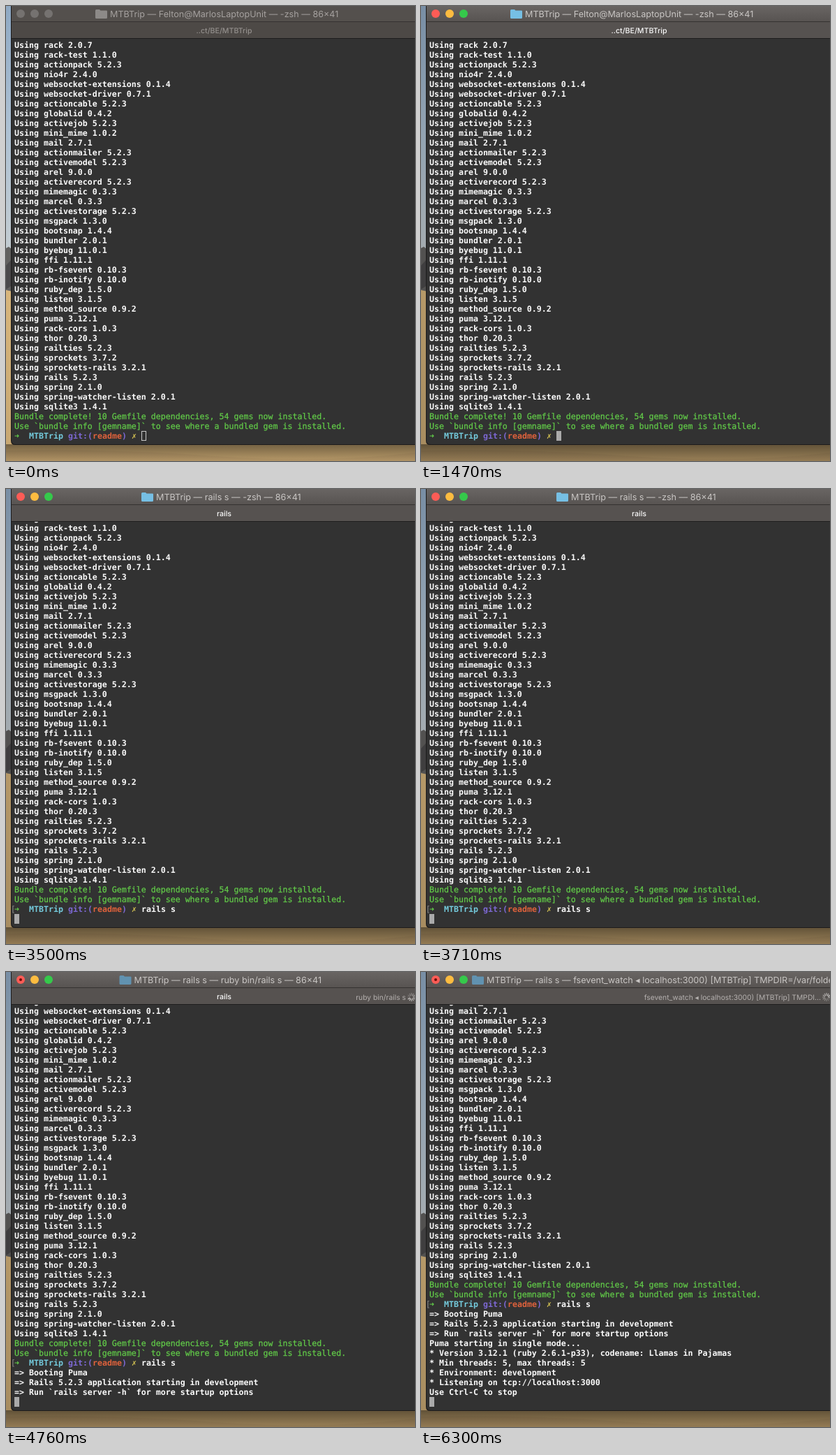
These frames come from a looping animation (586x652 px, 6.37 s). An HTML page:

```html
<!DOCTYPE html>
<html lang="en">
<head>
<meta charset="utf-8">
<title>Terminal session</title>
<style>
  html, body { margin: 0; width: 100%; height: 100%; overflow: hidden; background: #333; }
  svg { display: block; width: 586px; height: 652px; }
  text { white-space: pre; text-rendering: geometricPrecision; }
  .mono { font: bold 11.627px "DejaVu Sans Mono", monospace; fill: #fbfbfb; }
  .ui { font-family: Inter, sans-serif; }
  .green { font-weight: normal; fill: #62cb49; stroke: #62cb49; stroke-width: .25px; }
</style>
</head>
<body>
<svg id="stage" viewBox="0 0 586 652" xmlns="http://www.w3.org/2000/svg">
  <defs>
    <linearGradient id="sky" x2="0" y2="1">
      <stop offset="0" stop-color="#8fa9c4"/>
      <stop offset=".5" stop-color="#adc1d3"/>
      <stop offset="1" stop-color="#c3ccd1"/>
    </linearGradient>
    <linearGradient id="sand" x2="0" y2="1">
      <stop offset="0" stop-color="#d8b67c"/>
      <stop offset="1" stop-color="#c6a671"/>
    </linearGradient>
    <linearGradient id="under" x2="0" y2="1">
      <stop offset="0" stop-color="#000" stop-opacity=".42"/>
      <stop offset="1" stop-color="#000" stop-opacity=".08"/>
    </linearGradient>
    <linearGradient id="activeBar" x2="0" y2="1">
      <stop offset="0" stop-color="#696563"/>
      <stop offset="1" stop-color="#575351"/>
    </linearGradient>
  </defs>
  <rect width="586" height="348" fill="url(#sky)"/>
  <path d="M0 347L4 345L9 349V410H0Z" fill="#62615f"/>
  <path d="M0 372L9 362V400L0 406Z" fill="#4b4a4b"/>
  <path d="M0 407L9 409V628H586V652H0Z" fill="url(#sand)"/>
  <path d="M0 637Q150 634 300 645T586 640V652H0Z" fill="#b79868" opacity=".45"/>
  <rect y="628" width="586" height="24" fill="url(#under)"/>
  <rect id="shade" width="586" height="652" fill="#000"/>
  <path d="M7 0V623Q7 629 13 629H586V0Z" fill="#1c1b1b"/>
  <path d="M8 0V622Q8 628 14 628H586V0Z" fill="#323232"/>
  <g id="screen" class="mono"></g>
  <rect id="cursor" height="14"/>
  <rect id="titleBar" x="8" width="578" height="23"/>
  <rect id="tabBar" x="8" y="23" width="578" height="23"/>
  <path d="M8 22.5H586" stroke="#353231"/>
  <path d="M8 46.5H586" stroke="#1e1d1d"/>
  <g id="lights"></g>
  <circle id="edited" cx="21" cy="11" r="2" fill="#6d0d0a"/>
  <path id="folder" d="M0 6.5Q0 5 1.5 5H6L7.5 6.5H16Q17 6.5 17 7.5V16.5Q17 18 15.5 18H1.5Q0 18 0 16.5Z"/>
  <text id="title" class="ui" y="16" font-size="12.6"></text>
  <text id="tab" class="ui" x="312.5" y="39" font-size="10.6" font-weight="500" text-anchor="middle"></text>
  <text id="process" class="ui" x="573" y="40" font-size="10.3" text-anchor="end" fill="#b5b1af"></text>
  <g id="spinner" transform="translate(581 36)" stroke="#d6d3d1" stroke-width="1.1" stroke-linecap="round"></g>
</svg>
<script>
const LOOP = 6370, TICK = 70, COL = 7, ROW = 14, LEFT = 12, TOP = 49;
const ACTIVATE = 1190, ENTER = 3430, RUBY = 4200, BOOT = 4690, LISTEN = 4900, WATCH = 4970;
const KEY_TIMES = [2310, 2450, 2590, 2800, 2940, 3080, 3220];
const COMMAND = "rails s";

const gems = `rack 2.0.7|rack-test 1.1.0|actionpack 5.2.3|nio4r 2.4.0|websocket-extensions 0.1.4
websocket-driver 0.7.1|actioncable 5.2.3|globalid 0.4.2|activejob 5.2.3|mini_mime 1.0.2|mail 2.7.1
actionmailer 5.2.3|activemodel 5.2.3|arel 9.0.0|activerecord 5.2.3|mimemagic 0.3.3|marcel 0.3.3
activestorage 5.2.3|msgpack 1.3.0|bootsnap 1.4.4|bundler 2.0.1|byebug 11.0.1|ffi 1.11.1
rb-fsevent 0.10.3|rb-inotify 0.10.0|ruby_dep 1.5.0|listen 3.1.5|method_source 0.9.2|puma 3.12.1
rack-cors 1.0.3|thor 0.20.3|railties 5.2.3|sprockets 3.7.2|sprockets-rails 3.2.1|rails 5.2.3
spring 2.1.0|spring-watcher-listen 2.0.1|sqlite3 1.4.1`.split(/[|\n]/);

const summary = [
  "Bundle complete! 10 Gemfile dependencies, 54 gems now installed.",
  "Use `bundle info [gemname]` to see where a bundled gem is installed."
];

const output = [
  "=> Booting Puma",
  "=> Rails 5.2.3 application starting in development",
  "=> Run `rails server -h` for more startup options",
  "Puma starting in single mode...",
  "* Version 3.12.1 (ruby 2.6.1-p33), codename: Llamas in Pajamas",
  "* Min threads: 5, max threads: 5",
  "* Environment: development",
  "* Listening on tcp://localhost:3000",
  "Use Ctrl-C to stop"
];

// Column, text and colour of each part of the shell prompt
const prompt = [
  [0, "➜", "#62cb49"], [3, "MTBTrip", "#74cbdd"], [11, "git:(", "#7d68d4"],
  [16, "readme", "#e0623c"], [22, ")", "#7d68d4"], [24, "✗", "#d8c653"]
];
const INPUT_COL = 26;

const titles = {
  shell: { x: 149, text: "MTBTrip — Felton@MarlosLaptopUnit — -zsh — 86×41", tab: "..ct/BE/MTBTrip", process: "" },
  rails: { x: 215, text: "MTBTrip — rails s — -zsh — 86×41", tab: "rails", process: "" },
  ruby: { x: 183.5, text: "MTBTrip — rails s — ruby bin/rails s — 86×41", tab: "rails", process: "ruby bin/rails s" },
  watch: {
    x: 94, text: "MTBTrip — rails s — fsevent_watch ◂ localhost:3000) [MTBTrip] TMPDIR=/var/folders/",
    tab: "", process: "fsevent_watch ◂ localhost:3000) [MTBTrip] TMPDI..."
  }
};

const el = {};
document.querySelectorAll("[id]").forEach(node => el[node.id] = node);

function set(node, attrs) {
  for (const name in attrs) node.setAttribute(name, attrs[name]);
}

function add(parent, tag, attrs, text = "") {
  const node = document.createElementNS("http://www.w3.org/2000/svg", tag);
  set(node, attrs);
  node.textContent = text;
  return parent.appendChild(node);
}

const colX = col => LEFT + col * COL;
const addText = (col, row, text, attrs = {}) =>
  add(el.screen, "text", { x: colX(col), y: TOP + row * ROW + 11, ...attrs }, text);

gems.forEach((gem, i) => addText(0, i, "Using " + gem));
summary.forEach((line, i) => addText(0, gems.length + i, line, { class: "green" }));
const promptRow = gems.length + summary.length;
prompt.forEach(([col, text, color]) => addText(col, promptRow, text, { fill: color }));
const typed = addText(INPUT_COL, promptRow, "");
const bracket = addText(-.75, promptRow, "[", { fill: "#8b8b8b", "font-weight": "normal" });
const outputNodes = output.map((line, i) => addText(0, promptRow + 1 + i, line));

const lights = ["#fc5c56", "#fdbc40", "#35c94b"].map((color, i) =>
  ({ color, node: add(el.lights, "circle", { cx: 21 + 20 * i, cy: 11, r: 6 }) }));
const SPOKES = 12;
const spokes = Array.from({ length: SPOKES }, (_, i) =>
  add(el.spinner, "path", { d: "M0 -2.7V-5.6", transform: `rotate(${i * 360 / SPOKES})` }));

function drawWindow(t) {
  const active = t >= ACTIVATE;
  const running = t >= RUBY;
  const title = titles[t < ENTER ? "shell" : t < RUBY ? "rails" : t < WATCH ? "ruby" : "watch"];
  set(el.shade, { opacity: active ? .16 : 0 });
  set(el.titleBar, { fill: active ? "url(#activeBar)" : "#54504d" });
  set(el.tabBar, { fill: active ? "#565250" : "#4d4946" });
  lights.forEach(({ node, color }) => set(node, { fill: active ? color : "#757270" }));
  set(el.edited, { opacity: running ? 1 : 0 });
  set(el.folder, {
    transform: `translate(${title.x - 21} 0)`,
    fill: !active ? "#8d8a88" : running ? "#6192b0" : "#76bfe4"
  });
  set(el.title, { x: title.x, fill: active ? "#c9c6c4" : "#a5a19f" });
  el.title.textContent = title.text;
  set(el.tab, { fill: active ? "#fafafa" : "#94908d" });
  el.tab.textContent = title.tab;
  el.process.textContent = title.process;
  set(el.spinner, { opacity: running ? 1 : 0 });
  const head = Math.floor(t / 84);
  spokes.forEach((spoke, i) => {
    const age = ((head - i) % SPOKES + SPOKES) % SPOKES;
    set(spoke, { opacity: 1 - age * .07 });
  });
}

function drawScreen(t) {
  const entered = t >= ENTER;
  const count = KEY_TIMES.filter(time => t >= time).length;
  const printed = t < BOOT ? 0 : t < LISTEN ? 3 : output.length;
  const scroll = entered ? 1 + printed : 0;
  typed.textContent = COMMAND.slice(0, count);
  set(bracket, { opacity: entered ? 1 : 0 });
  outputNodes.forEach((node, i) => set(node, { opacity: i < printed ? 1 : 0 }));
  set(el.screen, { transform: `translate(0 ${-scroll * ROW})` });

  const x = colX(entered ? 0 : INPUT_COL + count);
  const y = TOP + promptRow * ROW;
  set(el.cursor, t < ACTIVATE
    ? { x: x + .5, y: y + .5, width: 6, height: 13, fill: "none", stroke: "#c8c8c8" }
    : { x, y, width: 7, height: 14, fill: "#aaaaaa", stroke: "none" });
}

let lastTick = -1;
function frame() {
  const tick = Math.floor(performance.now() % LOOP / TICK);
  if (tick !== lastTick) {
    lastTick = tick;
    drawWindow(tick * TICK);
    drawScreen(tick * TICK);
  }
  requestAnimationFrame(frame);
}
frame();
</script>
</body>
</html>
```
